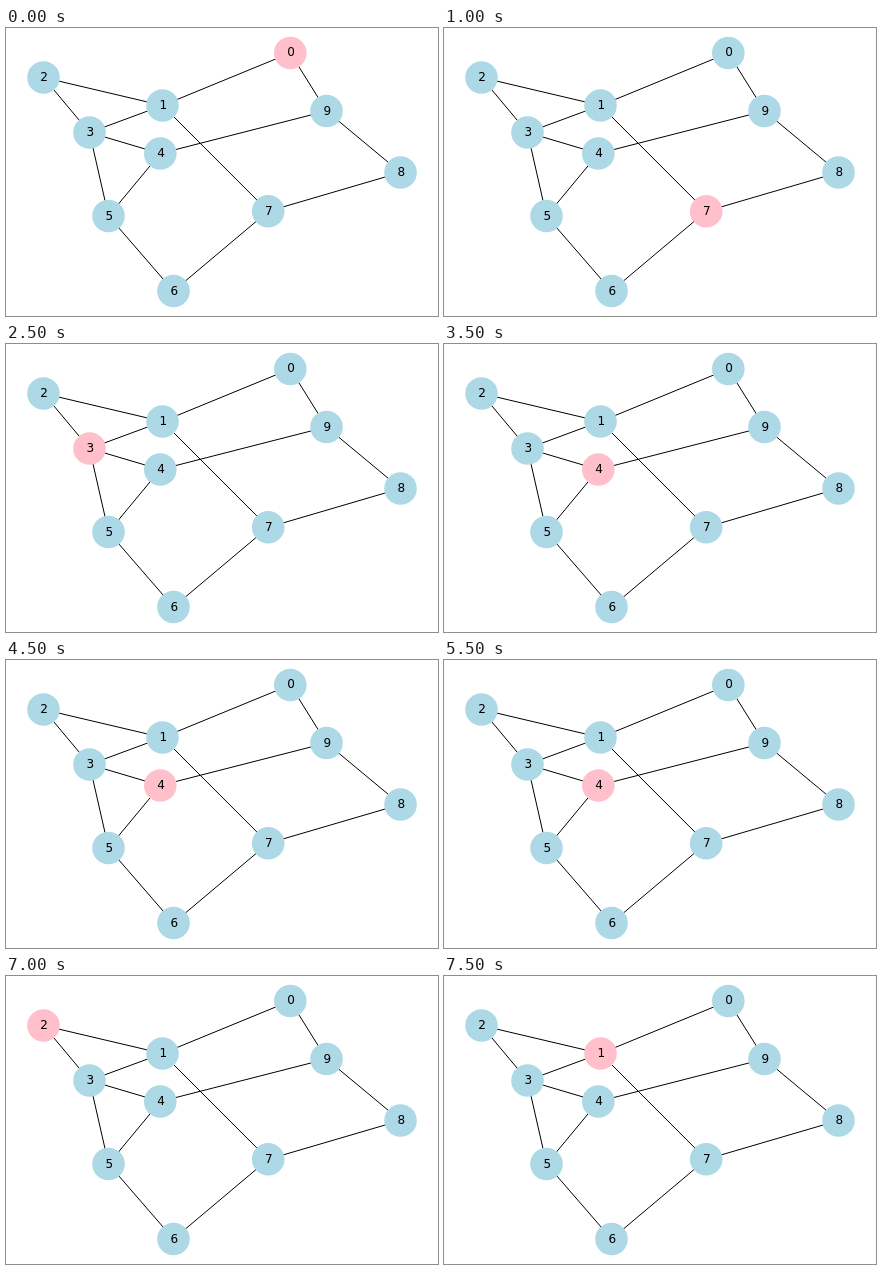
An HTML page that plays this animation: 432 px wide and 288 px high, repeating every 8000 ms.

```html
<!DOCTYPE html>
<html lang="en">
<head>
<meta charset="utf-8">
<title>Random walk on a graph</title>
<style>
  html, body { margin: 0; width: 100%; height: 100%; overflow: hidden; background: #fff; }
  svg { display: block; }
  line { stroke: #000; stroke-width: 1; }
  circle { fill: lightblue; }
  circle.active { fill: pink; }
  text { font: 12px "DejaVu Sans", sans-serif; text-anchor: middle; }
</style>
</head>
<body>
<svg width="432" height="288" viewBox="0 0 432 288"></svg>
<script>
const STEP = 500;
const nodes = [
  [284.3, 24.99], [156.5, 77.5], [37.49, 49.5], [83.5, 104.5], [154.3, 125.5],
  [102.5, 188], [167.5, 263.01], [262.2, 183.3], [394.51, 144.5], [320.5, 83]
];
const chords = ["13", "17", "35", "49"];
const walk = "0176535454343121";

const svg = document.querySelector("svg");

function add(tag, attrs, text = "") {
  const el = document.createElementNS("http://www.w3.org/2000/svg", tag);
  for (const key in attrs) el.setAttribute(key, attrs[key]);
  el.textContent = text;
  return svg.appendChild(el);
}

function link(a, b) {
  const [x1, y1] = nodes[a], [x2, y2] = nodes[b];
  add("line", { x1, y1, x2, y2 });
}

// A ring through all nodes, plus a few chords
nodes.forEach((_, i) => link(i, (i + 1) % nodes.length));
chords.forEach(([a, b]) => link(a, b));

const circles = nodes.map(([cx, cy]) => add("circle", { cx, cy, r: 16.3 }));
nodes.forEach(([x, y], i) => add("text", { x: x + 0.7, y: Math.floor(y + 4) }, i));

const start = performance.now();

function draw() {
  const elapsed = Math.max(0, performance.now() - start);
  const current = +walk[Math.floor(elapsed / STEP) % walk.length];
  circles.forEach((c, i) => c.classList.toggle("active", i === current));
  requestAnimationFrame(draw);
}
draw();
</script>
</body>
</html>
```
